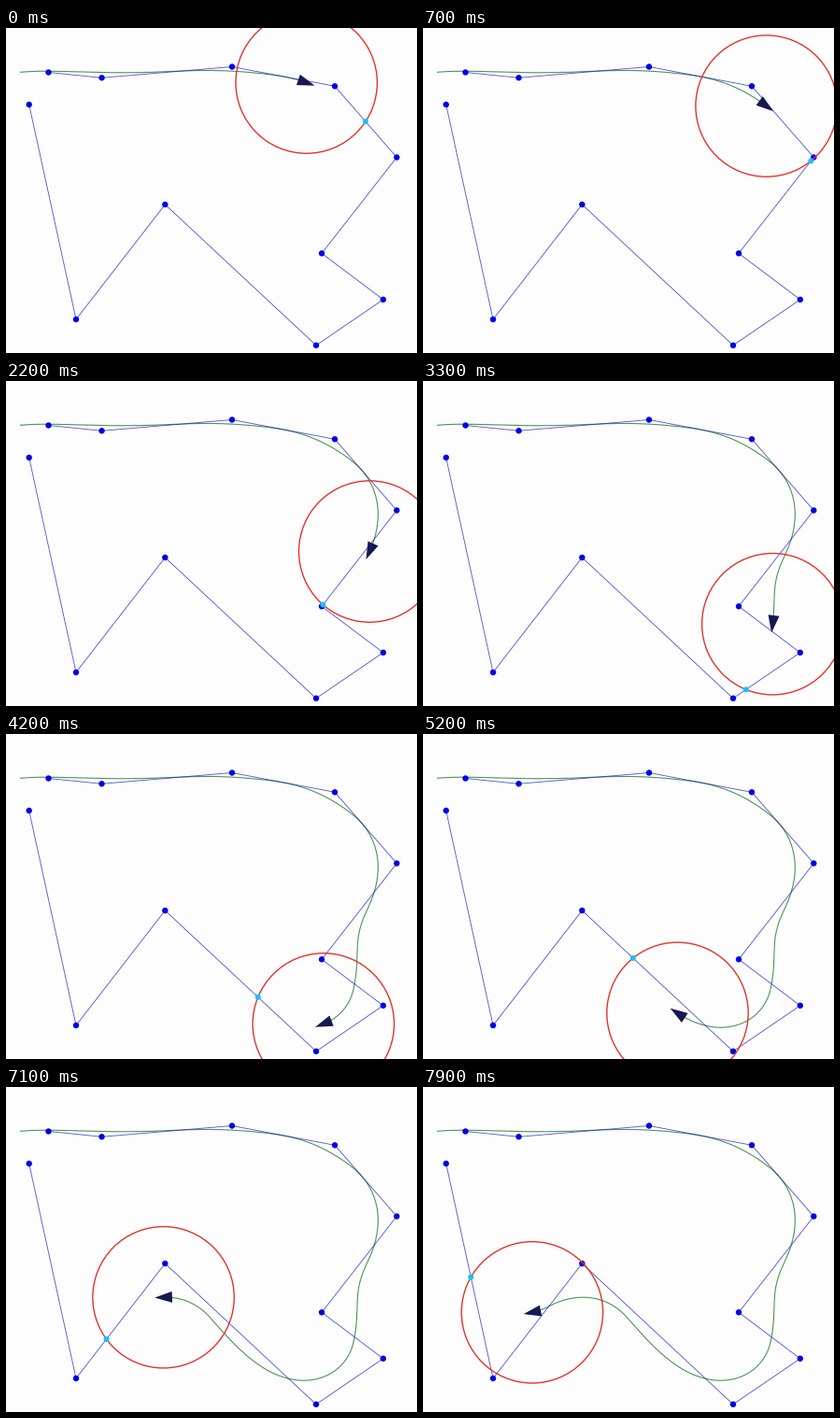
Animation of 440x348 px, one loop 8 s. Source, as a matplotlib script:

```python
import numpy as np
import matplotlib.pyplot as plt
from matplotlib.animation import FuncAnimation
from matplotlib.patches import Circle, Polygon

W, H, DPI = 440, 348, 80
PX = 72 / DPI
FRAMES, STEP = 80, 100
LOOKAHEAD = 75.7
DS = 0.5                    # distance driven per simulation step
SPEED, SLOWDOWN = 7.52, 0.0047
START_X = 321.5             # where the vehicle is when the loop begins

ROUTE = np.array([
    (45.5, 47.5), (102.5, 53.3), (242, 41.5), (352, 62.3), (418.3, 138.5),
    (338, 241.3), (403.8, 290.8), (332, 339.8), (170.3, 189), (75, 312),
    (24.7, 82)])


def crossing(c, i):
    """Furthest point of route segment i on the lookahead circle, or None."""
    a, d = ROUTE[i], ROUTE[i + 1] - ROUTE[i]
    f = a - c
    A, B, C = d @ d, f @ d, f @ f - LOOKAHEAD**2
    disc = B * B - A * C
    if disc < 0:
        return None
    for u in ((-B + disc**0.5) / A, (-B - disc**0.5) / A):
        if 0 <= u <= 1:
            return a + u * d
    return None


def drive(length):
    """Pure pursuit: steer on the arc that leads through the goal point."""
    pos, head = np.array([15.5, 47.3]), np.radians(-5)
    goal, seg = ROUTE[1], 0
    rows = []
    for _ in range(int(length / DS)):
        for i in (seg + 1, seg):
            hit = crossing(pos, i) if i < len(ROUTE) - 1 else None
            if hit is not None:
                goal, seg = hit, i
                break
        rows.append((*pos, head, *goal))
        dx, dy = goal - pos
        bend = 2 * np.sin(np.arctan2(dy, dx) - head) / LOOKAHEAD
        mid = head + bend * DS / 2
        pos = pos + DS * np.array([np.cos(mid), np.sin(mid)])
        head += bend * DS
    return np.array(rows)


RUN = drive(900)
START = int(np.argmax(RUN[:, 0] >= START_X))

fig = plt.figure(figsize=(W / DPI, H / DPI), dpi=DPI, facecolor="#fdfdfd")
ax = fig.add_axes([0, 0, 1, 1])
ax.set(xlim=(0, W), ylim=(H, 0))
ax.axis("off")

trail, = ax.plot([], [], color="#1f7a2a", alpha=0.8, lw=1.1 * PX, zorder=1)
ax.plot(*ROUTE.T, color="#1414c4", alpha=0.7, lw=0.9 * PX, zorder=2)
for xy in ROUTE:
    ax.add_patch(Circle(xy, 3.2, fc="#0000e6", lw=0, zorder=4))
ring = ax.add_patch(Circle((0, 0), LOOKAHEAD, fc="none", ec="#e3342c",
                           lw=1.4 * PX, zorder=5))
target = ax.add_patch(Circle((0, 0), 3, fc="#12c4fa", lw=0, zorder=6))
arrow = ax.add_patch(Polygon(np.zeros((3, 2)), fc="#171752", lw=0, zorder=7))


def draw(step):
    driven = SPEED * step - SLOWDOWN * step**2
    now = min(START + int(round(driven / DS)), len(RUN) - 1)
    x, y, head, gx, gy = RUN[now]
    c = np.array([x, y])
    d = np.array([np.cos(head), np.sin(head)])
    side = np.array([-d[1], d[0]])
    trail.set_data(RUN[:now + 1, 0], RUN[:now + 1, 1])
    ring.center = c
    target.center = gx, gy
    back = c - 9.3 * d
    arrow.set_xy([c + 9.4 * d, back + 6 * side, back - 6 * side])
    return trail, ring, target, arrow


anim = FuncAnimation(fig, draw, frames=FRAMES, interval=STEP,
                     repeat=True, repeat_delay=0)
plt.show()
```
